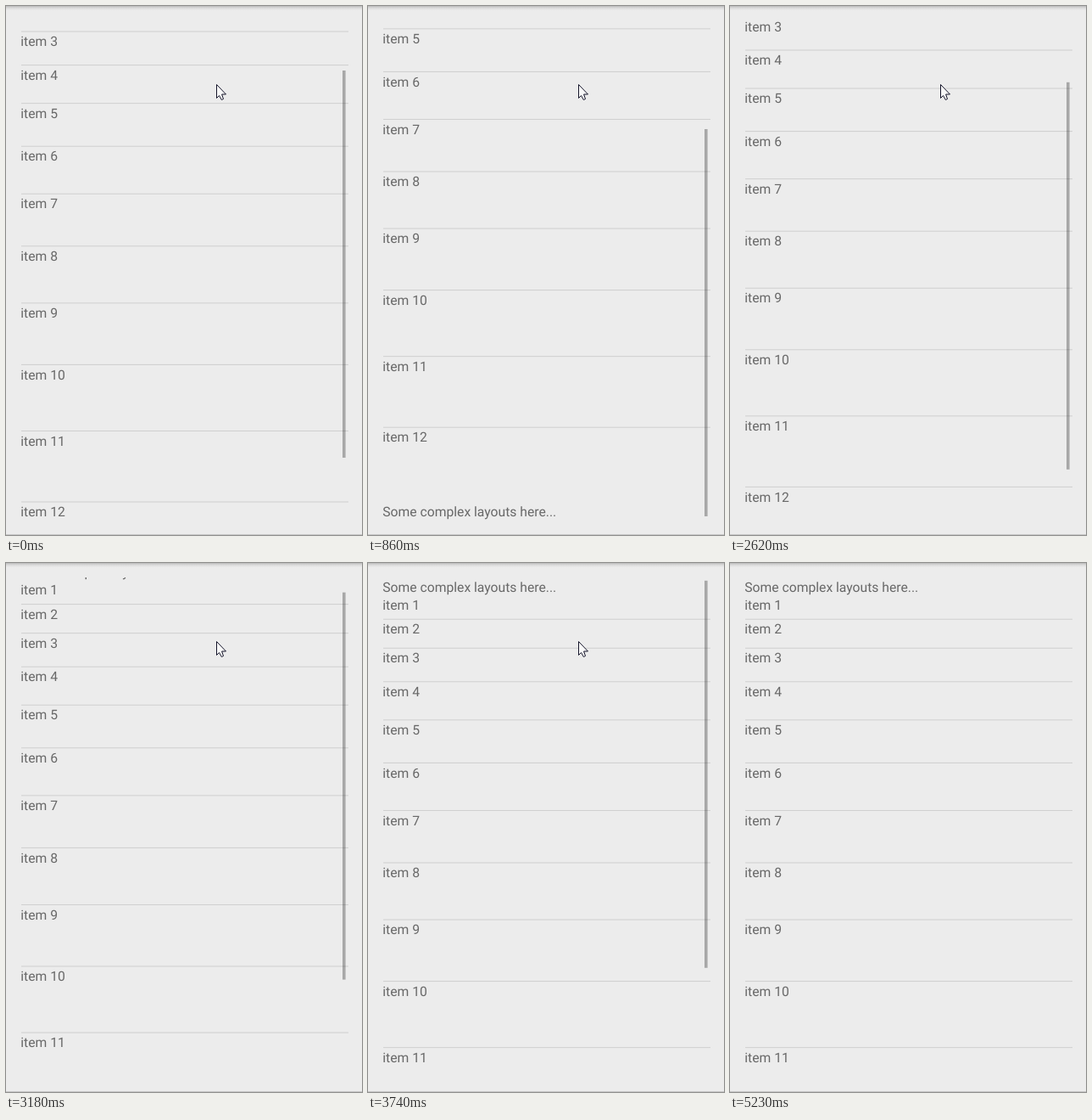
An HTML page with a canvas for the animation above (6190 ms loop, 420x623 px).

```html
<!DOCTYPE html>
<html lang="en">
<head>
<meta charset="utf-8">
<title>Scrolling list</title>
<style>
  html, body { margin: 0; width: 100%; height: 100%; overflow: hidden; background: #ececec; }
  canvas { display: block; }
</style>
</head>
<body>
<canvas id="stage" width="420" height="623"></canvas>
<script>
const ctx = document.getElementById('stage').getContext('2d');
const LOOP = 6190, ITEMS = 12, LABEL = 'Some complex layouts here...';
const SWIPE = 70.2, MAX_SCROLL = 158;

// Three swipes scroll down, three scroll back; the bar fades when the finger lifts.
const swipes = [
  { at: 0, dir: 1 }, { at: 550, dir: 1 }, { at: 860, dir: 1, lift: 1290 },
  { at: 2620, dir: -1 }, { at: 3180, dir: -1, lift: 3590 }, { at: 3740, dir: -1, lift: 4140 }
];
const arrow = new Path2D('M.5 .5V16.5L3.5 13.5L6.3 18.5L8.5 17.5L6.6 12H11.5Z');

const clamp = (v, lo, hi) => Math.min(hi, Math.max(lo, v));

// Rows grow by a constant amount, so their edges follow a quadratic.
const rowBottom = k => 65.7 + 34.05 * (k - 1) + 2.75 * (k - 1) * (k - 2);

function drawList(offset) {
  ctx.save();
  ctx.beginPath();
  ctx.rect(0, 17, 420, 589);
  ctx.clip();
  ctx.translate(0, -offset);
  ctx.font = '15.7px Roboto, sans-serif';
  ctx.textRendering = 'geometricPrecision';
  const text = (label, y) => {
    ctx.fillStyle = '#686868';
    ctx.fillText(label, 17.3, y);
  };
  text(LABEL, 34);
  for (let k = 1; k <= ITEMS; k++) {
    text('item ' + k, k === 1 ? 54.5 : rowBottom(k - 1) + 17.6);
    if (k < ITEMS) {
      ctx.fillStyle = '#cfcfcf';
      ctx.fillRect(18, rowBottom(k), 386, 1);
    }
  }
  text(LABEL, 759);
  ctx.restore();
}

function drawBar(offset, alpha) {
  ctx.fillStyle = `rgba(0, 0, 0, ${0.29 * alpha})`;
  ctx.fillRect(397, 20.8 + offset * 0.786, 3.6, 456);
}

function drawEdges() {
  const shadow = ctx.createLinearGradient(0, 0, 0, 5);
  shadow.addColorStop(0, '#b8b8b8');
  shadow.addColorStop(0.4, '#d8d8d8');
  shadow.addColorStop(1, '#ececec');
  ctx.fillStyle = shadow;
  ctx.fillRect(0, 0, 420, 5);
  ctx.fillStyle = '#c8c8c8';
  ctx.fillRect(0, 622, 420, 1);
}

// The pointer rests, then speeds away in four steps and leaves.
function drawPointer(t) {
  if (t >= 5230) return;
  const step = clamp(Math.floor((t - 4690) / 130) + 1, 0, 4);
  const move = (step / 4) ** 8;
  ctx.save();
  ctx.translate(Math.round(248 + 102 * move), Math.round(92 + 12 * move));
  ctx.fillStyle = '#f8f8f8';
  ctx.strokeStyle = '#15152a';
  ctx.fill(arrow);
  ctx.stroke(arrow);
  ctx.restore();
}

function frame(t) {
  const done = swipes.filter(s => s.at <= t);
  const offset = done.reduce((y, s) => clamp(y + s.dir * SWIPE, 0, MAX_SCROLL), 0);
  const { lift = LOOP } = done[done.length - 1];
  const alpha = t < lift ? 1 : t < lift + 120 ? 0.5 : 0;
  ctx.fillStyle = '#ececec';
  ctx.fillRect(0, 0, 420, 623);
  drawEdges();
  drawList(offset);
  drawBar(offset, alpha);
  drawPointer(t);
}

const start = performance.now();
function tick() {
  frame((performance.now() - start) % LOOP);
  requestAnimationFrame(tick);
}
tick();
</script>
</body>
</html>
```
